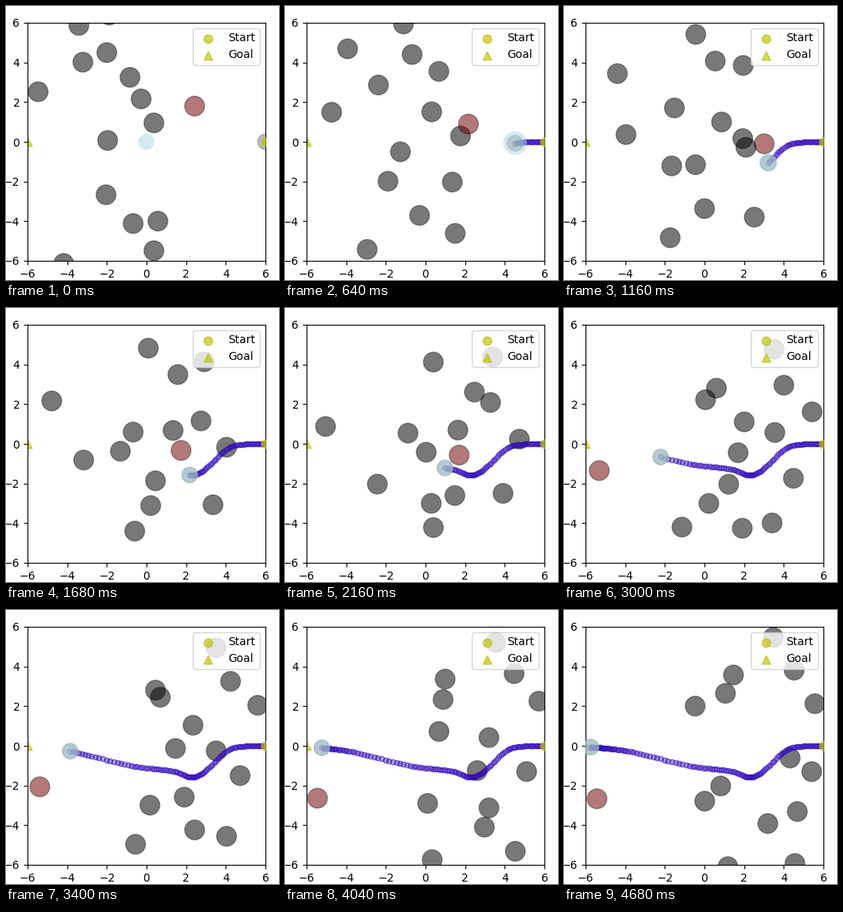
These frames come from a looping animation (342x343 px, 5120 ms). A matplotlib script:

```python
import numpy as np
import matplotlib.pyplot as plt
from matplotlib.animation import FuncAnimation

W, H, DPI = 342, 343, 100
FRAMES, LAST, INTERVAL = 128, 117, 40
SIDE, LEFT, BOTTOM = 298, 27, 24
UNIT = SIDE / 12
CENTER = LEFT + SIDE / 2, H - BOTTOM - SIDE / 2


def smooth(knots, values, t):
    """Cubic Hermite curve through values given at uneven knots."""
    slopes = np.gradient(values, knots, axis=0, edge_order=2)
    k = np.clip(np.searchsorted(knots, t, side="right") - 1, 0, len(knots) - 2)
    column = (-1,) + (1,) * (values.ndim - 1)
    h = (knots[k + 1] - knots[k]).reshape(column)
    u = (t - knots[k]).reshape(column) / h
    return ((1 + 2 * u) * (1 - u) ** 2 * values[k]
            + u * (1 - u) ** 2 * h * slopes[k]
            + u * u * (3 - 2 * u) * values[k + 1]
            + u * u * (u - 1) * h * slopes[k + 1])


def from_rest(t):
    """Time warp that lets the walkers pick up speed at the start."""
    return t * t / (t + 6)


def route_y(x):
    """A slow slope on the left, a steep one on the right, a dip between."""
    slope = 1.28 / (1 + np.exp(-.85 * (x + 2.3)))
    edge = 1 / (1 + np.exp(3.2 * (x - 3.62)))
    dip = .34 * np.exp(-2 * (x - 2.3) ** 2)
    return -(slope * edge + dip)


steps = np.arange(LAST + 1.)

robot_keys = np.array([(0, 6), (16, 4.52), (36, 2.6), (42, 2.18), (65, -.47),
                       (85, -3.85), (101, -5.23), (117, -5.73)])
robot_x = smooth(*robot_keys.T, steps)
robot_path = np.column_stack([robot_x, route_y(robot_x)])

# Each walker passes four points, in stage pixels
walker_steps = np.array([0., 42, 85, 117])
walkers = np.array([
    [(91, 24), (57, 116), (42, 221), (41, 236)],
    [(129, 11), (178, 50), (193, 109), (202, 104)],
    [(126, 58), (215, 83), (263, 176), (196, 220)],
    [(155, 89), (248, 67), (263, 47), (262, 34)],
    [(169, 116), (209, 153), (234, 144), (283, 185)],
    [(185, 146), (276, 174), (315, 119), (314, 117)],
    [(96, 70), (159, 155), (223, 234), (292, 252)],
    [(40, 107), (97, 190), (162, 293), (205, 321)],
    [(127, 168), (187, 216), (276, 283), (289, 317)],
    [(125, 236), (143, 179), (187, 100), (212, 81)],
    [(159, 272), (181, 247), (180, 244), (176, 239)],
    [(190, 269), (244, 141), (281, 89), (288, 75)],
    [(185, 306), (259, 246), (293, 207), (310, 202)],
    [(72, 322), (161, 279), (236, 275), (255, 267)],
    [(236, 125), (219, 178), (212, 173), (164, 120)]])
tracks = smooth(from_rest(walker_steps), walkers.swapaxes(0, 1),
                from_rest(steps))
tracks = (tracks + .3 - CENTER) / UNIT * (1, -1)

fig = plt.figure(figsize=(W / DPI, H / DPI), dpi=DPI, facecolor="white")
ax = fig.add_axes([LEFT / W, BOTTOM / H, SIDE / W, SIDE / H])
ax.set(xlim=(-6, 6), ylim=(-6, 6),
       xticks=range(-6, 7, 2), yticks=range(-6, 7, 2))

marks = dict(c="y", s=60, alpha=.65)
ax.scatter(6, 0, marker="o", zorder=4, label="Start", **marks)
ax.scatter(-6, 0, marker="^", zorder=1.5, label="Goal", **marks)
ax.legend(loc="upper right")


def disc(radius, **style):
    return ax.add_patch(plt.Circle((0, 0), radius, **style))


CALM, NEAR = (0, 0, 0, .53), (.44, 0, 0, .53)
obstacles = [disc(.5, fc=CALM, ec=(0, 0, 0, .35), lw=1) for _ in walkers]
trail = ax.scatter([], [], s=20, linewidths=1, zorder=2,
                   facecolors=[(.2, .05, .75, .35)],
                   edgecolors=[(.18, .02, .72, .6)])
body = disc(.39, color="gray", alpha=.52, zorder=3)
halo = disc(.4, fc="lightblue", ec="none", alpha=.53, zorder=3.1)


def draw(frame):
    i = min(frame, LAST)
    robot = robot_path[i]
    nearest = np.argmin(np.hypot(*(tracks[i] - robot).T))
    for k, circle in enumerate(obstacles):
        circle.center = tracks[i, k]
        circle.set_facecolor(NEAR if k == nearest else CALM)
    trail.set_offsets(robot_path[1:i + 1])
    body.center = robot
    halo.center = robot if i else (0, 0)
    # The safety halo swells early on, then settles to the body size
    swell = np.clip(min(i / 8, (32 - i) / 10), 0, 1)
    halo.set_radius(.41 + .19 * swell)
    return [*obstacles, trail, body, halo]


anim = FuncAnimation(fig, draw, frames=FRAMES, interval=INTERVAL,
                     repeat=True, repeat_delay=0, blit=False)
plt.show()
```
